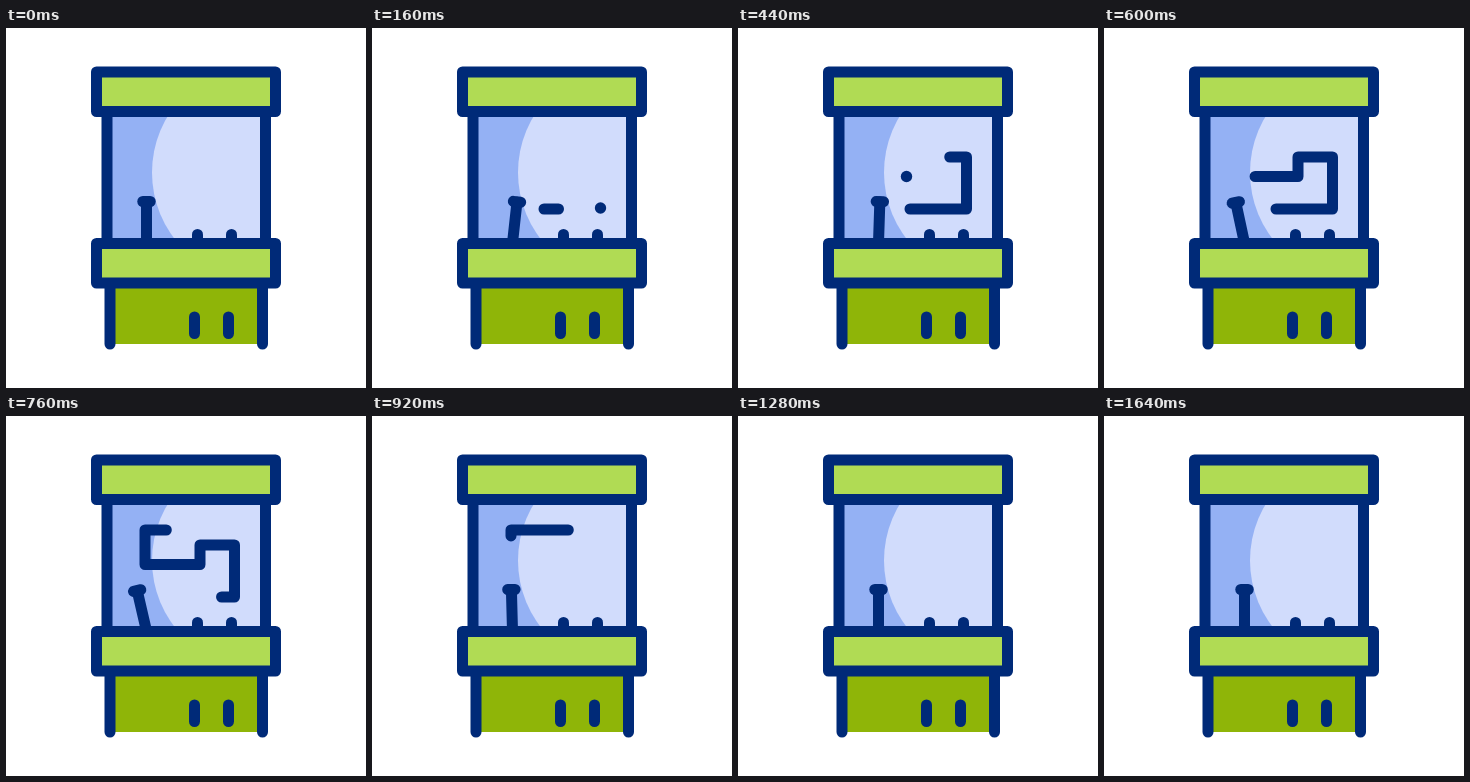
An HTML page with a canvas that plays this animation: 360 by 360 pixels, repeating every 2000 ms.

```html
<!DOCTYPE html>
<html lang="en">
<head>
<meta charset="utf-8">
<title>Arcade machine</title>
<style>
  html, body { margin: 0; width: 100%; height: 100%; overflow: hidden; background: #fff; }
  canvas { display: block; width: 360px; height: 360px; }
</style>
</head>
<body>
<canvas id="stage"></canvas>
<script>
const SIZE = 360, LOOP = 2000, STEP = 40;
const NAVY = '#002a78', LIME = '#b0db54', GREEN = '#8fb508';
const GLASS = '#94b1f4', SHINE = '#d1dcfc';

const canvas = document.getElementById('stage');
const ctx = canvas.getContext('2d');
const ratio = window.devicePixelRatio || 1;
canvas.width = canvas.height = SIZE * ratio;

// Route of the snake, from its first cell to its last
const route = [[172, 181], [228.5, 181], [228.5, 129], [194, 129],
               [194, 148.5], [139, 148.5], [139, 114], [198, 114]];
const lengths = route.slice(1).map(([x, y], i) => Math.hypot(x - route[i][0], y - route[i][1]));
const total = lengths.reduce((a, b) => a + b, 0);

const foods = [
  { x: 228.5, y: 180, from: 40, to: 300 },
  { x: 168.5, y: 148.5, from: 300, to: 570 }
];

// Stick angle in degrees over time
const tilt = [[40, 0], [280, 12.5], [640, -13], [760, -13], [1000, 2.5], [1120, 0]];

function ease(t, from, to) {
  const u = Math.min(1, Math.max(0, (t - from) / (to - from)));
  return u * u * (3 - 2 * u);
}

function keyed(keys, t) {
  let value = keys[0][1];
  for (let i = 1; i < keys.length; i++) {
    value += (keys[i][1] - keys[i - 1][1]) * ease(t, keys[i - 1][0], keys[i][0]);
  }
  return value;
}

function line(points) {
  ctx.beginPath();
  points.forEach(([x, y]) => ctx.lineTo(x, y));
  ctx.stroke();
}

function rect(x, y, w, h, color) {
  ctx.fillStyle = color;
  ctx.fillRect(x, y, w, h);
}

function disc(x, y, r, color) {
  ctx.fillStyle = color;
  ctx.beginPath();
  ctx.arc(x, y, r, 0, Math.PI * 2);
  ctx.fill();
}

function panel(y, h) {
  rect(90.5, y, 179, h, LIME);
  ctx.strokeRect(90.5, y, 179, h);
}

function drawGlass() {
  rect(101, 84, 158.5, 131, GLASS);
  ctx.save();
  ctx.beginPath();
  ctx.rect(101, 84, 158.5, 131);
  ctx.clip();
  disc(255, 144.5, 109, SHINE);
  ctx.restore();
}

function drawSnake(t) {
  const head = total * ease(t, 40, 960);
  const tail = total * ease(t, 680, 1020);
  if (head - tail < 0.1) return;
  const points = [];
  let start = 0;
  lengths.forEach((len, i) => {
    const a = Math.max(tail, start), b = Math.min(head, start + len);
    if (a < b) {
      const [x, y] = route[i], [nx, ny] = route[i + 1];
      for (const s of [a, b]) {
        const u = (s - start) / len;
        points.push([x + (nx - x) * u, y + (ny - y) * u]);
      }
    }
    start += len;
  });
  line(points);
}

function drawStick(t) {
  ctx.save();
  ctx.translate(140.5, 215);
  ctx.rotate(keyed(tilt, t) * Math.PI / 180);
  line([[0, 0], [0, -41]]);
  line([[-3.7, -41.5], [3.7, -41.5]]);
  ctx.restore();
}

function draw(t) {
  ctx.setTransform(ratio, 0, 0, ratio, 0, 0);
  rect(0, 0, SIZE, SIZE, '#fff');
  ctx.strokeStyle = NAVY;
  ctx.lineWidth = 11;
  ctx.lineCap = ctx.lineJoin = 'round';

  rect(104, 255, 152.5, 61, GREEN);
  drawGlass();
  for (const f of foods) {
    if (t >= f.from && t < f.to) disc(f.x, f.y, 5.7, NAVY);
  }
  drawSnake(t);
  drawStick(t);
  for (const x of [191.5, 225.5]) line([[x, 206.5], [x, 215]]);
  for (const x of [101, 259.5]) line([[x, 84], [x, 215]]);
  for (const x of [104, 256.5]) line([[x, 255], [x, 316]]);
  for (const x of [188.5, 222.5]) line([[x, 289], [x, 305.5]]);
  panel(44, 39.5);
  panel(215.5, 39.5);
}

const begin = performance.now();
function tick() {
  const t = (performance.now() - begin) % LOOP;
  draw(Math.floor(t / STEP) * STEP);
  requestAnimationFrame(tick);
}
tick();
</script>
</body>
</html>
```
